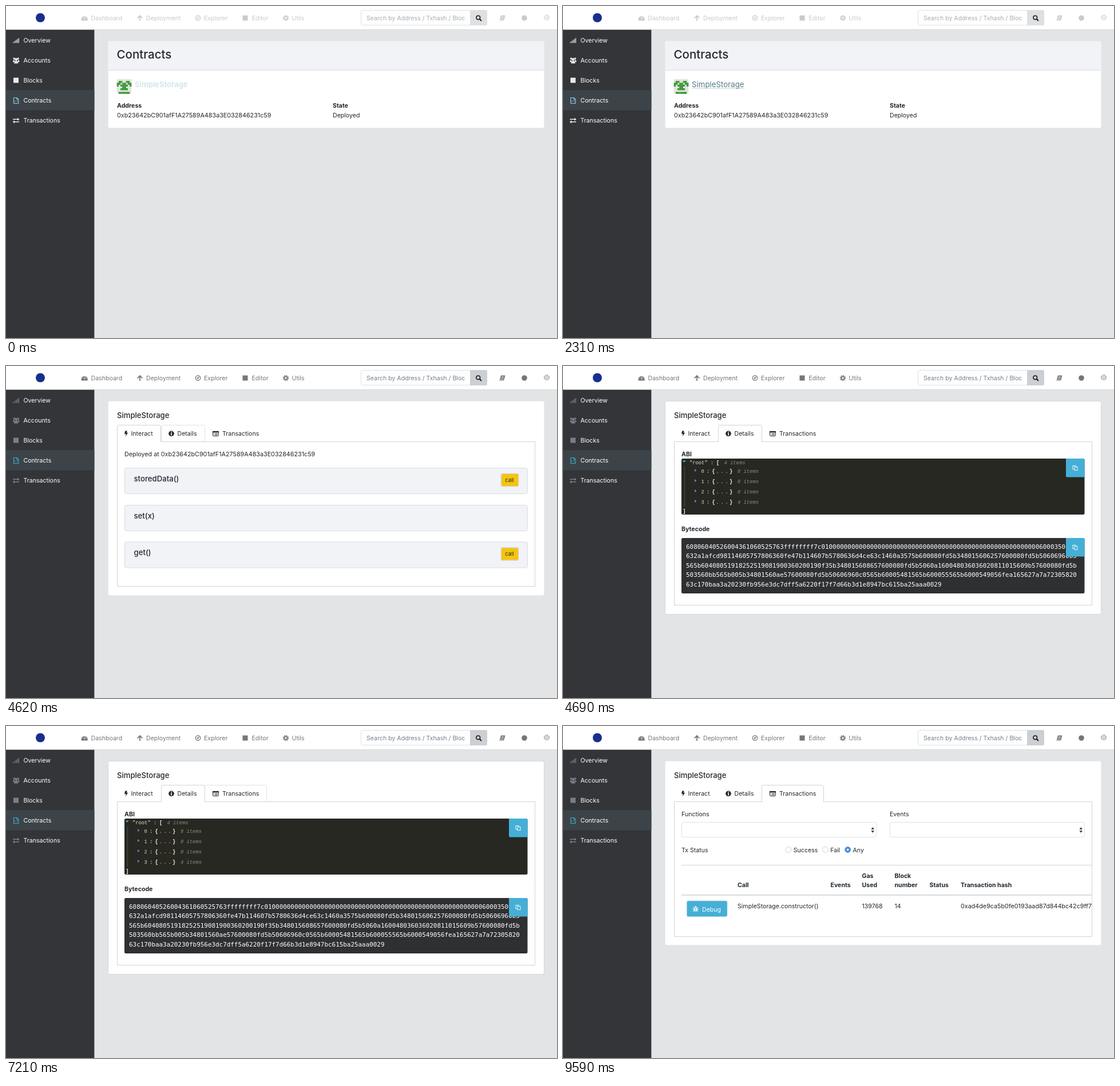
These frames come from a looping animation (963x581 px, 9.66 s). An HTML page:

```html
<!DOCTYPE html>
<html lang="en">
<head>
<meta charset="utf-8">
<title>Contract explorer</title>
<style>
  html, body { margin: 0; width: 100%; height: 100%; overflow: hidden; background: #e3e4e6; }
  svg { display: block; width: 963px; height: 581px; }
  text { font-family: Inter, "Open Sans", sans-serif; white-space: pre; }
  .code { font-family: "DejaVu Sans Mono", monospace; }
  .tree { font-family: "Liberation Mono", monospace; }
</style>
</head>
<body>
<svg id="stage" viewBox="0 0 963 581"></svg>
<script>
const LOOP = 9660;
const INK = '#23282c', BLUE = '#45afd6', LINE = '#cfd4d8';
const HEX_SIZE = 10.78;
const ADDRESS = '0xb23642bC901afF1A27589A483a3E032846231c59';
const BYTECODE = [
  '60806040526004361060525763ffffffff7c01' + '0'.repeat(56) + '6000350416',
  '632a1afcd98114605757806360fe47b114607b5780636d4ce63c1460a3575b600080fd5b348015606257600080fd5b50606960b5',
  '565b604080519182525190819003602001' + '90f35b348015608657600080fd5b5060a160048036036020811015609b57600080fd5b',
  '503560bb565b005b34801560ae57600080fd5b50606960c0565b60005481565b600055565b6000549056fea165627a7a72305820',
  '63c170baa3a20230fb956e3dc7dff5a6220f17f7d66b3d1e8947bc615ba25aaa0029'
];

// Start time of each change on screen
const STEPS = [
  [0,    { page: 'list', faint: true }],
  [1540, { page: 'list', faint: true, hover: true }],
  [2380, { page: 'interact' }],
  [4410, { page: 'interact', hover: 'details' }],
  [4690, { page: 'details' }],
  [7070, { page: 'details', hover: 'transactions' }],
  [7280, { page: 'transactions' }]
];

const text = (x, y, s, o = {}) =>
  `<text x="${x}" y="${y}" font-size="${o.size || 10.6}" fill="${o.fill || INK}" font-weight="${o.weight || 400}" class="${o.cls || ''}" ${o.more || ''}>${s}</text>`;
const bold = (x, y, s) => text(x, y, s, { weight: 700 });
const rect = (x, y, w, h, fill, more = '') =>
  `<rect x="${x}" y="${y}" width="${w}" height="${h}" fill="${fill}" ${more}/>`;
const box = (x, y, w, h, fill, stroke, rx = 3) =>
  rect(x + .5, y + .5, w - 1, h - 1, fill, `rx="${rx}" stroke="${stroke}"`);
const path = (d, fill, more = '') => `<path d="${d}" fill="${fill}" ${more}/>`;
const line = (d, stroke, width = 1) => path(d, 'none', `stroke="${stroke}" stroke-width="${width}"`);
const dot = (x, y, r, fill, more = '') => `<circle cx="${x}" cy="${y}" r="${r}" fill="${fill}" ${more}/>`;
const ring = (x, y, r, color, width, more = '') =>
  dot(x, y, r, 'none', `stroke="${color}" stroke-width="${width}" ${more}`);

function cog(x, y, color, thin) {
  return ring(x, y, thin ? 3.6 : 2.7, color, thin ? .9 : 2)
    + ring(x, y, 4.5, color, 1.5, 'stroke-dasharray="1.77"')
    + (thin ? ring(x, y, 1.5, color, .9) : '');
}

function header(faint) {
  const color = faint ? '#c9cacc' : '#73777a';
  const labels = [[148.5, 'Dashboard'], [245, 'Deployment'], [346, 'Explorer'], [429.5, 'Editor'], [499.5, 'Utils']];
  return rect(0, 0, 963, 41, '#fff') + rect(0, 41, 963, 1, '#d3d6d9')
    + dot(60, 20.5, 8, '#17308c')
    + labels.map(([x, s]) => text(x, 25, s, { fill: color })).join('')
    + path('M132 25.5A5.6 5.6 0 1 1 142.4 25.5Z', color)
    + line('M137.2 23.5L138.4 18.5M134 21.5h1M139.8 21.5h1M135 18.5l.8.8', '#fff', 1)
    + line('M234 26V17.5M229.7 21.3L234 17L238.3 21.3', color, 1.8)
    + ring(335.5, 21, 4.2, color, 1.3) + path('M337.8 18.7L336.5 22L333.2 23.3L334.5 20Z', color)
    + rect(413.5, 16.5, 9, 9, color)
    + cog(489, 21, color)
    + box(620, 7, 193, 27, '#fff', '#dde0e4')
    + text(630, 25, 'Search by Address / Txhash / Bloc', { fill: faint ? '#a9adb1' : '#73818f' })
    + path('M811 7H838Q841 7 841 10V31Q841 34 838 34H811Z', faint ? '#dfe0e2' : '#cccfd3')
    + ring(825.3, 20.3, 3.3, '#16181a', 1.6) + line('M827.7 22.7L831 26', '#16181a', 2)
    + path('M865 16.5H872.5L870 25.5H862.5Z', color) + line('M866 19h4M865.4 21h4M863.5 24h6', '#fff', .8)
    + dot(906, 21, 4.8, color)
    + cog(945, 20, faint ? '#d2d3d5' : '#9a9da0', true);
}

function sidebar(faint) {
  const c = faint ? '#e8e9ea' : '#7a7f84';
  const cyan = faint ? '#8fd0e0' : '#40a9c6';
  const labels = ['Overview', 'Accounts', 'Blocks', 'Contracts', 'Transactions'];
  const bars = [0, 1, 2, 3, 4].map(i => rect(12.3 + i * 2.3, 63 - i * 1.7, 1.3, 1.7 + i * 1.7, c)).join('');
  const people = dot(14.2, 92, 1.7, c) + dot(21.2, 92, 1.7, c) + dot(17.7, 93.5, 2.4, c)
    + path('M12 98Q12 94 14.6 94.2L15 98ZM23.5 98Q23.5 94 20.8 94.2L20.4 98ZM14 100.5Q14 96 17.7 96T21.4 100.5Z', c);
  const file = path('M13.5 160.5H19L21.8 163.3V170.5H13.5Z', 'none', `stroke="${cyan}" stroke-width="1.1"`)
    + line('M18.7 160.5V163.6H21.8M16.5 165L15.2 166.6L16.5 168.2M18.8 165L20.1 166.6L18.8 168.2', cyan, .9);
  const swap = line('M12 198.3H21M14 202.7H23', c, 1.5) + path('M20 195.7L23.4 198.3L20 201ZM15 200L11.7 202.7L15 205.4Z', c);
  return rect(0, 41.6, 154.4, 539.4, '#343539') + rect(0, 147.4, 154.4, 35, '#3c4449')
    + labels.map((s, i) => text(30.5, 64 + i * 35, s, { fill: '#fff' })).join('')
    + bars + people + rect(13, 125.5, 9, 9, c) + file + swap;
}

const card = (bottom, edge = '#eceef0') => box(178, 61, 763, bottom - 61, '#fff', edge);

function avatar(x, y) {
  const rows = ['0000', '0110', '1101', '1011', '0001', '0011', '0000', '0111'];
  const cell = 3.2;
  let out = rect(x, y, 8 * cell, 8 * cell, '#dfe5df', 'rx="1"');
  rows.forEach((row, j) => [...row].forEach((bit, i) => {
    if (bit === '1') for (const k of [i, 7 - i]) out += rect(x + k * cell, y + j * cell, cell + .1, cell + .1, '#389630');
  }));
  return out;
}

function listPage({ hover }) {
  return card(214)
    + path('M179 112V64Q179 62 181 62H938Q940 62 940 64V112Z', '#f2f3f7') + rect(179, 112, 761, 1, '#d8dce1')
    + text(193.5, 92, 'Contracts', { size: 20.5, weight: 500 })
    + avatar(193.7, 128)
    + text(225, 142, 'SimpleStorage', hover ? { size: 13.3, fill: '#587d88' } : { size: 13.1, fill: '#cde4e9', weight: 600 })
    + (hover ? rect(225.5, 143.5, 92, .8, '#a6bec5') : '')
    + bold(194, 178, 'Address') + text(194, 194.7, ADDRESS, { size: HEX_SIZE })
    + bold(571, 178, 'State') + text(571, 194.7, 'Deployed');
}

const TABS = { interact: [194, 271], details: [271, 348], transactions: [347, 456] };

function tabs(page, hover, bottom) {
  const shape = ([a, b], stroke) => path(`M${a + .5} 133V106Q${a + .5} 103.5 ${a + 3} 103.5H${b - 3}Q${b - .5} 103.5 ${b - .5} 106V133`, '#fff', `stroke="${stroke}"`);
  return text(194, 90.5, 'SimpleStorage', { size: 13.1, weight: 500 })
    + (hover ? shape(TABS[hover], '#e0e3e6') : '')
    + box(194, 132, 731, bottom - 132, '#fff', LINE, 0)
    + shape(TABS[page], LINE)
    + path('M208.2 113.5H211.8L210.8 116.8H213.3L208.8 123.3L209.7 118.8H207Z', INK)
    + text(218.5, 122.3, 'Interact')
    + dot(289, 118.3, 4.8, INK) + rect(288.2, 117.4, 1.8, 4, '#fff') + rect(288.2, 114.8, 1.8, 1.6, '#fff')
    + text(299.5, 122.3, 'Details')
    + box(361, 114, 11, 9, '#fff', INK, 1) + rect(361, 114, 11, 2.4, INK)
    + line('M363 118.2h1M365 118.2h5M363 120.4h1M365 120.4h5', INK, 1)
    + text(378, 122.3, 'Transactions');
}

function interactPage({ hover }) {
  const row = (y, name, call) => box(207, y, 705, 46, '#f1f3f7', '#d8dce1')
    + text(223.5, y + 23.7, name, { size: 13.2, weight: 500 })
    + (call ? rect(865.5, y + 10.5, 30, 22, '#f5c40d', 'rx="2" stroke="#d8d3bd" stroke-width="1.5"')
      + text(872.3, y + 24.5, 'call', { size: 9.4 }) : '');
  return card(402) + tabs('interact', hover, 386)
    + text(207, 158, 'Deployed at ' + ADDRESS, { size: HEX_SIZE })
    + row(178, 'storedData()', true) + row(243, 'set(x)') + row(307.5, 'get()', true);
}

function copyButton(y) {
  return path(`M879 ${y}H909Q911.5 ${y} 911.5 ${y + 2.5}V${y + 32.5}H881Q879 ${y + 32.5} 879 ${y + 30.5}Z`, BLUE)
    + rect(891, y + 12.5, 5, 6, 'none', 'stroke="#fff" stroke-width=".9"')
    + rect(894, y + 14.5, 5, 6, BLUE, 'stroke="#fff" stroke-width=".9"');
}

function detailsPage({ hover }) {
  const mono = (x, y, s, fill, more = '', weight = 400) => text(x, y, s, { size: 8.8, cls: 'tree', fill, more, weight });
  const count = (x, y, n) => mono(x, y, n + ' items', '#8f8c7c', 'font-style="italic"');
  const rows = [8, 8, 8, 4].map((n, i) => {
    const y = 187 + i * 18;
    return path(`M230 ${y - 7}L233.5 ${y - 4.5}L230 ${y - 2}Z`, '#7f78d6')
      + mono(241.5, y, i, '#d6d4c6') + mono(251, y, ':', '#f4f3ea')
      + mono(260.5, y, '{', '#f8f8f2', '', 700)
      + mono(267.5, y, '...', '#fd971f', 'letter-spacing="2.7"', 700)
      + mono(291, y, '}', '#f8f8f2', '', 700) + count(305, y, n);
  }).join('');
  return card(435, '#d3d7da') + tabs('details', hover, 419)
    + bold(207, 158, 'ABI') + rect(207, 162, 704.5, 98, '#272822', 'rx="2.5"')
    + path('M208.7 165.5H214.7L211.7 168.7Z', '#4fb5b0') + line('M212.5 176V246', '#4b4c45')
    + mono(221, 171.7, '"root" :', '#e6e4d8') + mono(268, 171.7, '[', '#f8f8f2', '', 700) + count(281.5, 171.7, 4)
    + rows + mono(209.3, 257, ']', '#f8f8f2', '', 700)
    + copyButton(162)
    + bold(207, 289, 'Bytecode') + rect(207, 301, 704.5, 97, '#2f3032', 'rx="2.5"')
    + BYTECODE.map((s, i) => text(215, 320 + i * 16.4, s, { size: 10.91, cls: 'code', fill: '#fff' })).join('')
    + copyButton(301);
}

function transactionsPage() {
  const select = x => box(207 + x, 168, 341, 27, '#fff', '#dde1e5')
    + path(`M${538.5 + x} 181L${541.3 + x} 177L${544 + x} 181ZM${538.5 + x} 183L${541.3 + x} 187L${544 + x} 183Z`, '#3a4046');
  const radio = (x, s, on) => dot(x, 216.5, 5, on ? '#4a90e2' : '#fff', `stroke="${on ? '#4a8fdc' : '#c9ccd0'}" stroke-width=".9"`)
    + (on ? dot(x, 216.5, 1.8, '#fff') : '') + text(x + 8.8, 220.5, s);
  const heads = [[305, 282, 'Call'], [467.5, 282, 'Events'], [522.5, 265.7, 'Gas'], [522.5, 282, 'Used'],
    [579.5, 265.7, 'Block'], [579.5, 282, 'number'], [640.5, 282, 'Status'], [695, 282, 'Transaction hash']];
  const cells = [[305, 'SimpleStorage.constructor()'], [522.5, '139768'], [579.5, '14']];
  const bug = path('M229.3 317.7Q231.7 312.5 234.1 317.7ZM228.8 318.5H231.2V325Q228.8 324 228.8 321ZM232.2 318.5H234.6V321Q234.6 324 232.2 325Z', '#fff')
    + line('M229 319L227 317M228.8 321H226.3M229 323L227 325M234.4 319L236.4 317M234.6 321H237.1M234.4 323L236.4 325', '#fff', 1);
  return card(384) + tabs('transactions', null, 369)
    + text(207, 158, 'Functions') + text(571, 158, 'Events') + select(0) + select(364)
    + text(207, 220.5, 'Tx Status')
    + radio(394, 'Success') + radio(458.5, 'Fail') + radio(497.7, 'Any', true)
    + rect(207, 243, 717, 1, LINE) + heads.map(h => bold(...h)).join('')
    + rect(207, 295, 717, 1.6, LINE)
    + rect(216.5, 306, 70.5, 27.5, BLUE, 'rx="2.5" stroke="#a9cfdf" stroke-width=".7"') + bug
    + text(243, 324.7, 'Debug', { fill: '#fff' })
    + cells.map(([x, s]) => text(x, 318.7, s)).join('')
    + text(695, 318.7, '0xad4de9ca5b0fe0193aad87d844bc42c9ff7', { size: HEX_SIZE });
}

const PAGES = { list: listPage, interact: interactPage, details: detailsPage, transactions: transactionsPage };
const stage = document.getElementById('stage');
let shown;

function draw(t) {
  const state = STEPS.filter(([start]) => start <= t).pop()[1];
  if (state === shown) return;
  shown = state;
  stage.innerHTML = rect(0, 0, 963, 581, '#e3e4e6') + header(state.faint) + sidebar(state.faint) + PAGES[state.page](state);
}

function tick() {
  draw(performance.now() % LOOP);
  requestAnimationFrame(tick);
}
tick();
</script>
</body>
</html>
```
